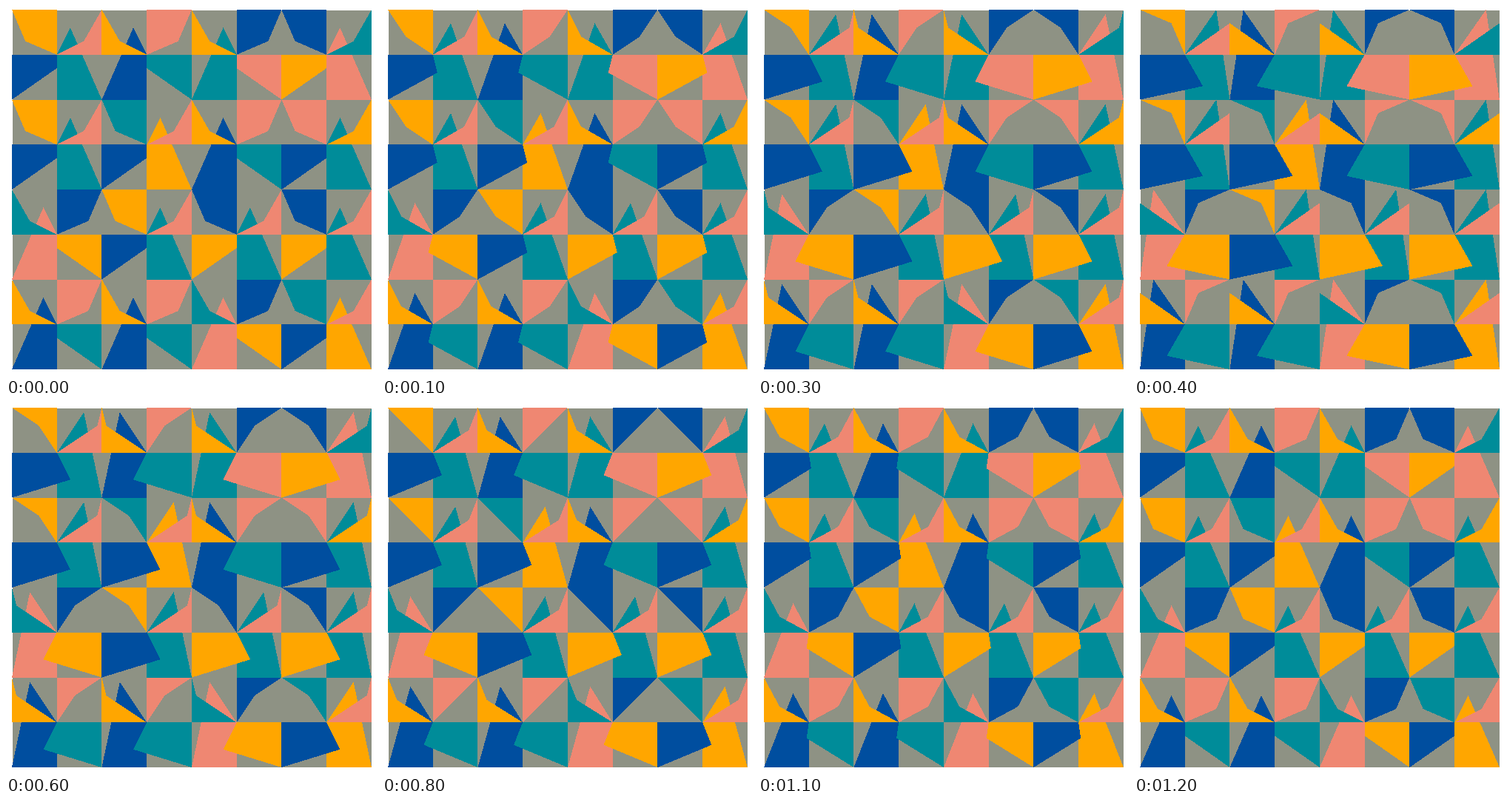
Animation of 500x500 px, one loop 1.3 s. Source, as an HTML page:

```html
<!DOCTYPE html>
<html lang="en">
<head>
<meta charset="utf-8">
<title>Folding tiles</title>
<style>
  html, body { margin: 0; width: 100%; height: 100%; overflow: hidden; background: #fff; }
  svg { display: block; width: 500px; height: 500px; }
</style>
</head>
<body>
<svg viewBox="0 0 500 500" shape-rendering="crispEdges">
  <rect x="9" y="6" width="485" height="485" fill="#8e9284"/>
</svg>
<script>
const LEFT = 7.95, TOP = 5.05, CELL = 60.75;
const STEP = 100, STEPS = 13, PEAK = 4;
const COLORS = { o: '#ffa600', p: '#ef8772', b: '#004e9f', t: '#008c99' };

// One word per 2x2 tile: colours of lower, wing, corner and flap; "-" mirrors it.
const TILES = [
  'tpob', 'bopt-', 'tobp-', 'ptbo',
  'tpob', 'optb', 'bopt-', 'topb',
  'ptbo-', 'tpob', 'tpbo', 'tpbo',
  'bopt-', 'bopt-', 'ptbo-', 'optb'
];

// Quads in cell units, painted in this order; s moves one vertex of each.
const quads = s => [
  [[1, 1], [1 + s, 0.7 - s], [2, 2], [1, 2]],
  [[1, 1], [1.3 + s, 1 - s], [2, 0], [2, 1]],
  [[0, 0], [1, 0], [1, 1], [s, 1 - s]],
  [[0, 1], [1, 1], [0.7 + s, 1 + s], [0, 2]]
];

const svg = document.querySelector('svg');
const tiles = TILES.map((word, i) => ({
  col: i % 4 * 2,
  row: Math.floor(i / 4) * 2,
  mirrored: word.endsWith('-'),
  shapes: [...word.slice(0, 4)].map(key => {
    const shape = document.createElementNS('http://www.w3.org/2000/svg', 'polygon');
    shape.setAttribute('fill', COLORS[key]);
    return svg.appendChild(shape);
  })
}));

function draw(step) {
  const s = step < PEAK ? 0.3 + 0.1 * step : 0.7 - 0.05 * (step - PEAK);
  const outline = quads(s);
  for (const { col, row, mirrored, shapes } of tiles) {
    shapes.forEach((shape, i) => {
      const points = outline[i].map(([x, y]) => [
        LEFT + CELL * (col + (mirrored ? 2 - x : x)),
        TOP + CELL * (row + y)
      ]);
      shape.setAttribute('points', points.join(' '));
    });
  }
}

const start = performance.now();
function tick() {
  draw(Math.floor((performance.now() - start) / STEP) % STEPS);
  requestAnimationFrame(tick);
}
tick();
</script>
</body>
</html>
```
